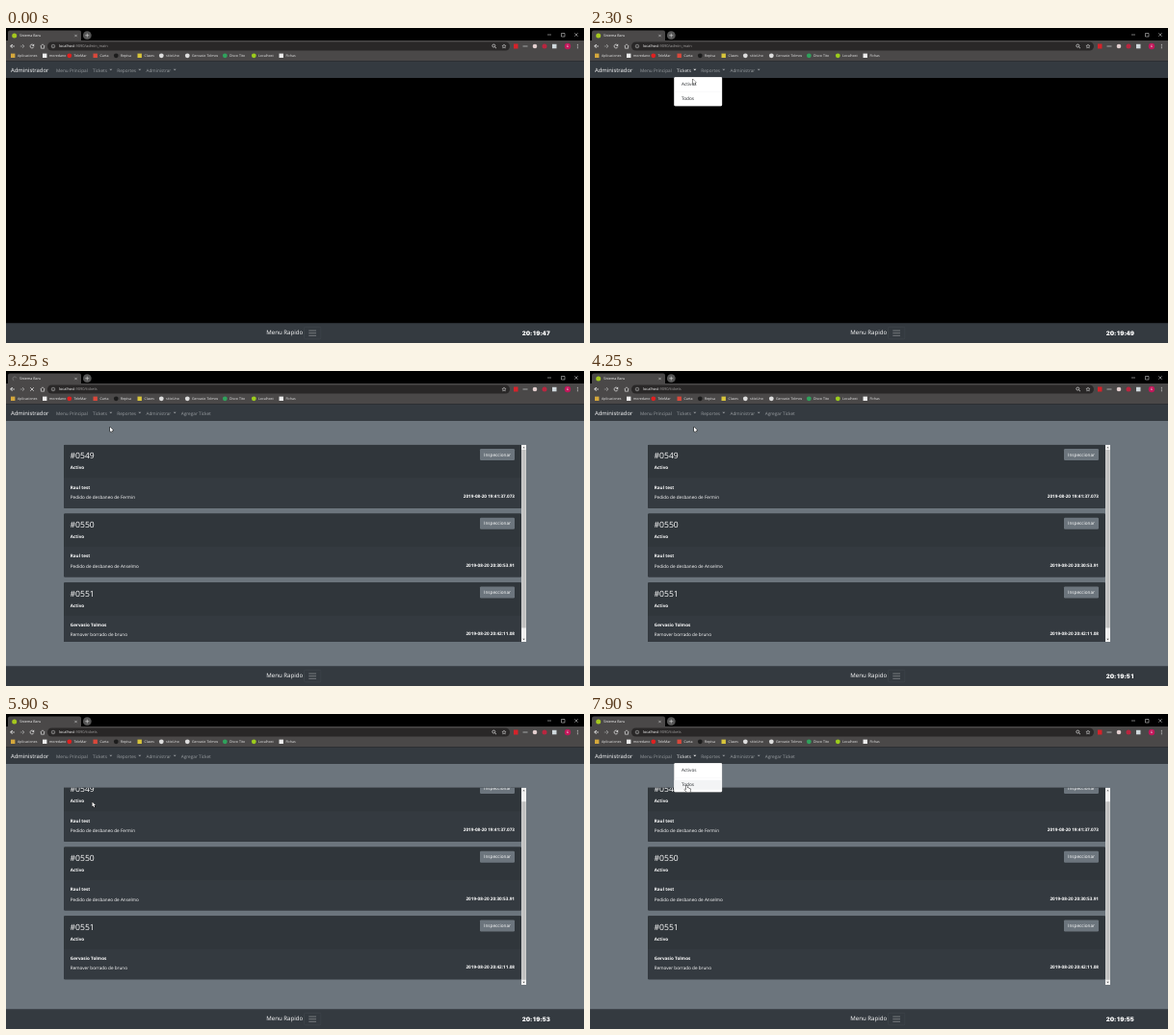
Write an HTML page with a canvas that moves like this. It is 600 by 328 pixels and loops after 8 s.

```html
<!DOCTYPE html>
<html lang="es">
<head>
<meta charset="utf-8">
<style>
html, body { margin: 0; width: 100%; height: 100%; overflow: hidden; background: #000; }
canvas { display: block; width: 600px; height: 328px; }
</style>
</head>
<body>
<canvas id="stage"></canvas>
<script>
const canvas = document.getElementById('stage');
const c = canvas.getContext('2d');
const ratio = window.devicePixelRatio || 1;
canvas.width = 600 * ratio;
canvas.height = 328 * ratio;
c.textRendering = 'geometricPrecision';

const LOOP = 8000;
const DARK = '#343a40', GRAY = '#6c757d', MUTED = '#999da0', CHROME = '#4a4848';

// Pointer path: time, x, y of the tip
const path = [
  [600, 130, 104], [750, 99, 53.5], [900, 99, 53.5], [1300, 103, 44.5],
  [1450, 103.5, 44.3], [1550, 104, 44], [2000, 104, 44], [2500, 108, 58.2],
  [4450, 108, 58.2], [4850, 122, 72], [5250, 98, 55], [5400, 93.6, 56],
  [5700, 89.5, 91.5], [5950, 89.5, 91.5], [6100, 88, 70], [6500, 101, 44.5],
  [7250, 101, 44.5], [7850, 100.5, 74.5], [8000, 100.5, 74.5]
];

const bookmarks = [
  [5, 'Aplicaciones', '#d5a73c'], [38, 'moredano', '#eee'], [63.5, 'TeleMar', '#e02020', 1],
  [90.5, 'Carta', '#d9483b'], [112, 'Repisa', '#1c1c1c', 1], [136.5, 'Clases', '#d8c53a'],
  [159, 'sitioUno', '#ddd', 1], [186, 'Gervasio Tolmos', '#ddd', 1], [225, 'Disco Tito', '#2fa25c', 1],
  [255, 'Localhost', '#9ccc1c', 1], [283.5, 'Fichas', '#eee']
];

const tickets = [
  ['#0549', 'Raul test', 'Pedido de desbaneo de Fermin', '2019-08-20 19:41:37.073'],
  ['#0550', 'Raul test', 'Pedido de desbaneo de Anselmo', '2019-08-20 20:30:53.91'],
  ['#0551', 'Gervasio Tolmos', 'Remover borrado de bruno', '2019-08-20 20:42:11.08']
];

function rect(x, y, w, h, color, r = 0) {
  c.fillStyle = color;
  c.beginPath();
  c.roundRect(x, y, w, h, r);
  c.fill();
}

function dot(x, y, r, color) {
  c.fillStyle = color;
  c.beginPath();
  c.arc(x, y, r, 0, 7);
  c.fill();
}

function poly(points, color, width, close) {
  c.beginPath();
  for (let i = 0; i < points.length; i += 2) c.lineTo(points[i], points[i + 1]);
  if (close) c.closePath();
  if (width) {
    c.strokeStyle = color;
    c.lineWidth = width;
    c.stroke();
  } else {
    c.fillStyle = color;
    c.fill();
  }
}

function ring(x, y, r, color, width, from = 0, to = 7) {
  c.beginPath();
  c.arc(x, y, r, from, to);
  c.strokeStyle = color;
  c.lineWidth = width;
  c.stroke();
}

function cross(x, y, r, color, width) {
  poly([x - r, y - r, x + r, y + r], color, width);
  poly([x - r, y + r, x + r, y - r], color, width);
}

function text(str, x, y, size, color = '#fff', weight = 400, align = 'left', family = '"Open Sans", "Noto Sans"') {
  c.font = `${weight} ${size}px ${family}, sans-serif`;
  c.fillStyle = color;
  c.textAlign = align;
  c.fillText(str, x, y);
  return c.measureText(str).width;
}

function pointerAt(t) {
  const i = path.findIndex(p => p[0] > t);
  if (i < 1) return null;
  const [a, b] = [path[i - 1], path[i]];
  const k = (t - a[0]) / (b[0] - a[0]), e = k * k * (3 - 2 * k);
  return { x: a[1] + (b[1] - a[1]) * e, y: a[2] + (b[2] - a[2]) * e };
}

function drawBrowser(t) {
  const loading = t >= 3000 && t < 4250;
  const onTickets = t >= 3000;
  rect(0, 0, 600, 14, '#000');
  rect(2, 2.5, 76, 14, CHROME, 2);
  rect(0, 13, 600, 21.5, CHROME);

  if (loading) ring(9, 8, 2, '#8a8a8a', 0.6, t / 120, t / 120 + 4);
  else dot(8.7, 8, 2.5, '#a5c81e');
  const title = t >= 3000 && t < 3250 ? 'localhost:9090/tickets' : 'Sistema Baru';
  text(title, 14, 9.4, 3.6);
  cross(72.5, 8, 1.2, '#ddd', 0.5);
  dot(84.3, 7.7, 4.4, '#555');
  poly([82.3, 7.7, 86.3, 7.7], '#ddd', 0.6);
  poly([84.3, 5.7, 84.3, 9.7], '#ddd', 0.6);

  poly([562, 7, 566, 7], '#eee', 0.5);
  poly([576.5, 5.5, 580, 5.5, 580, 9, 576.5, 9], '#eee', 0.5, true);
  cross(592, 7, 1.7, '#eee', 0.5);

  poly([9, 19, 4.7, 19, 6.7, 17, 4.7, 19, 6.7, 21], '#eee', 0.7);
  poly([14.8, 19, 19, 19, 17, 17, 19, 19, 17, 21], '#999', 0.7);
  if (loading) cross(27, 19, 1.8, '#eee', 0.7);
  else {
    ring(27, 19, 1.9, '#eee', 0.7, 0.3, 5.4);
    poly([29.2, 16.6, 29.2, 18.8, 27, 18.8], '#eee');
  }
  poly([35.8, 19, 38, 16.8, 40.2, 19, 39.6, 19, 39.6, 21.2, 36.4, 21.2, 36.4, 19], '#eee', 0.6, true);

  rect(43, 14.5, 480, 9, '#292727', 4.5);
  ring(49, 19, 1.8, '#ccc', 0.5);
  poly([49, 18.7, 49, 20], '#ccc', 0.5);
  const w = text('localhost', 55, 20.4, 3.95);
  text(onTickets ? ':9090/tickets' : ':9090/admin_main', 55 + w, 20.4, 3.95, '#a5a3a3');
  if (!loading) {
    ring(506.3, 18.5, 1.5, '#ddd', 0.7);
    poly([507.3, 19.5, 509, 21.2], '#ddd', 0.8);
  }
  const star = [];
  for (let i = 0; i < 10; i++) {
    const a = i * Math.PI / 5 - Math.PI / 2, r = i % 2 ? 1 : 2.2;
    star.push(517 + r * Math.cos(a), 19.1 + r * Math.sin(a));
  }
  poly(star, '#ddd', 0.5, true);

  rect(527, 16.5, 4.5, 5, '#d5222a');
  rect(536.5, 18, 5, 2, '#777');
  dot(549, 19, 2.3, '#e3cfcf');
  dot(559, 19, 2.5, '#b8263f');
  rect(567, 16.8, 4.5, 4.5, '#cfd8dc');
  dot(583, 19, 3.2, '#c2185b');
  text('G', 583, 20.2, 3.2, '#fff', 400, 'center');
  for (const y of [17.2, 19, 20.8]) dot(593.3, y, 0.5, '#eee');

  for (const [x, label, color, round] of bookmarks) {
    if (round) dot(x + 2.3, 28.8, 2.4, color);
    else rect(x, 26.6, 4.4, 4.4, color);
    text(label, x + 7, 30.2, 3.55, '#eee');
  }
}

function drawNav(t, lit) {
  rect(0, 34.5, 600, 17.5, DARK);
  text('Administrador', 5, 46, 5.9);
  const items = [['Menu Principal', 52], ['Tickets', 90, 107.3], ['Reportes', 115.3, 137.3], ['Administrar', 145.5, 173.7]];
  if (t >= 3250) items.push(['Agregar Ticket', 181.7]);
  for (const [label, x, caret] of items) {
    const color = lit && label === 'Tickets' ? '#f4f4f4' : MUTED;
    text(label, x, 45.5, 4.72, color);
    if (caret) poly([caret, 42.7, caret + 3, 42.7, caret + 1.5, 44.3], color, 0, true);
  }
}

function drawTickets(t) {
  const k = Math.min(1, Math.max(0, (t - 5750) / 140));
  const scroll = 10 * k * (2 - k);
  rect(0, 52, 600, 256, GRAY);
  c.save();
  c.beginPath();
  c.rect(60, 76.8, 480, 205.2);
  c.clip();
  tickets.forEach(([id, user, note, date], i) => {
    const y = 76.8 + i * 71.7 - scroll;
    rect(60, y, 475, 66.3, DARK, 1.2);
    rect(60, y, 475, 34.5, '#30363b', [1.2, 1.2, 0, 0]);
    text(id, 66.5, y + 14.6, 8.6);
    text('Activo', 66.8, y + 25.6, 4.6, '#fff', 700);
    text(user, 66.8, y + 45.7, 4.6, '#fff', 700);
    text(note, 66.8, y + 56, 4.65);
    text(date, 528, y + 55.2, 4.65, '#fff', 700, 'right');
    rect(492, y + 4.2, 36, 12, GRAY, 1.2);
    text('Inspeccionar', 510, y + 11.8, 4.7, '#fff', 400, 'center');
  });
  rect(535, 76.8, 5, 205.2, '#f1f1f1');
  rect(535.3, 82 + scroll * 0.93, 4.4, 185.5, '#c1c1c1');
  poly([536.3, 80.3, 538.7, 80.3, 537.5, 78.9], '#555');
  poly([536.3, 278.8, 538.7, 278.8, 537.5, 280.2], '#555');
  c.restore();
}

function drawFooter(t) {
  rect(0, 307.3, 600, 20.7, DARK);
  text('Menu Rapido', 270.3, 319.3, 6.1);
  c.beginPath();
  c.roundRect(309.5, 311.3, 17.3, 12.5, 1.2);
  c.strokeStyle = '#484e53';
  c.lineWidth = 0.4;
  c.stroke();
  for (const y of [315.1, 317.7, 320.3]) poly([314.3, y, 322, y], MUTED, 0.65);
  if (t >= 3250 && t < 3750) return;
  let x = 535.8;
  for (const ch of '20:19:' + (47 + Math.floor((t + 300) / 1000))) {
    const w = ch === ':' ? 2.1 : 4.15;
    text(ch, x + w / 2, 320.1, 6.2, '#fff', 900, 'center', 'Inter, Roboto');
    x += w;
  }
}

function drawMenu(p) {
  rect(87.2, 51, 50, 30.4, '#bbb', 1.4);
  rect(87.5, 51.3, 49.4, 29.8, '#fff', 1.2);
  if (p.y > 53.5 && p.y < 64) rect(87.5, 53.8, 49.4, 10, '#f3f4f5');
  if (p.y > 68) rect(87.5, 68.8, 49.4, 10, '#f3f4f5');
  rect(87.5, 66.2, 49.4, 0.35, '#e9ecef');
  text('Activos', 95, 60.1, 4.72, '#212529');
  text('Todos', 95, 75.4, 4.72, '#212529');
}

function drawPointer({ x, y }, hand) {
  c.save();
  c.translate(x, y);
  c.lineJoin = 'round';
  const shape = hand
    ? [-0.6, 0, 0.4, 0, 0.6, 2.4, 3.6, 3.2, 3.9, 5, 3.2, 7, 0, 7, -2.3, 4.2, -1.7, 3.6, -0.6, 4.4]
    : [0, 0, 0, 5, 1.1, 4, 1.9, 5.8, 2.7, 5.4, 1.9, 3.7, 3.5, 3.6];
  poly(shape, '#000', 0.8, true);
  poly(shape, '#fff');
  c.restore();
}

function draw(t) {
  const pointer = pointerAt(t);
  const open = t >= 1750 && t < 3000 || t >= 7100;
  const overLink = pointer && pointer.y < 50;
  c.setTransform(ratio, 0, 0, ratio, 0, 0);
  rect(0, 0, 600, 328, '#000');
  if (t >= 3250) drawTickets(t);
  drawBrowser(t);
  drawNav(t, open || overLink);
  drawFooter(t);
  if (open) drawMenu(pointer);
  const overItem = open && (pointer.y > 53.5 && pointer.y < 64 || pointer.y > 68);
  if (pointer) drawPointer(pointer, overLink || overItem);
}

function tick() {
  draw(performance.now() % LOOP);
  requestAnimationFrame(tick);
}
tick();
</script>
</body>
</html>
```
